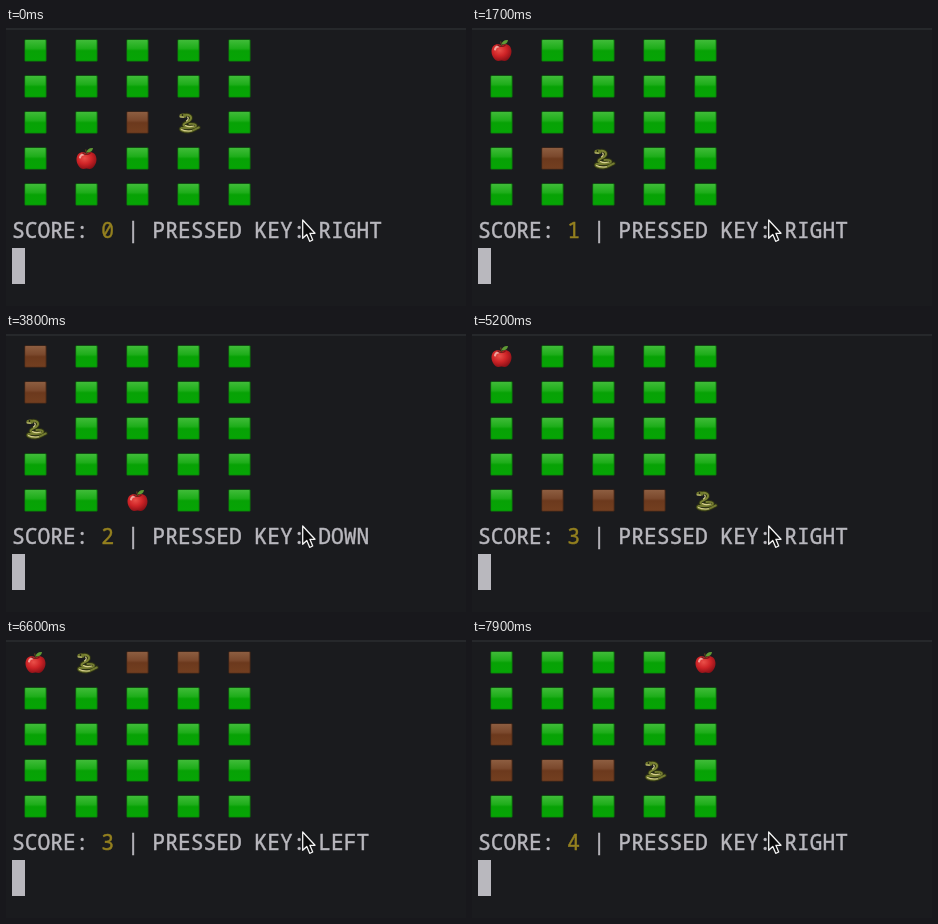
An HTML page for the animation above (8 s loop, 460 by 278 pixels).

```html
<!DOCTYPE html>
<html lang="en">
<head>
<meta charset="utf-8">
<title>Snake in a terminal</title>
<style>
  html, body { margin: 0; width: 100%; height: 100%; overflow: hidden; background: #1a1b1e; }
  svg { display: block; width: 100vw; height: 100vh; }
  text {
    font: 21.28px "Noto Sans Mono", "DejaVu Sans Mono", monospace;
    fill: #b9b8be; stroke: #b9b8be; stroke-width: .45; white-space: pre;
  }
  #score { fill: #94801f; stroke: #94801f; }
</style>
</head>
<body>
<svg viewBox="0 0 460 278">
  <defs>
    <linearGradient id="leafy" x2="0" y2="1">
      <stop offset="0" stop-color="#3fbb38"/>
      <stop offset=".4" stop-color="#1fae1b"/>
      <stop offset=".52" stop-color="#07a205"/>
      <stop offset="1" stop-color="#06a505"/>
    </linearGradient>
    <linearGradient id="earth" x2="0" y2="1">
      <stop offset="0" stop-color="#8d5d40"/>
      <stop offset=".4" stop-color="#7b492d"/>
      <stop offset=".52" stop-color="#6c391d"/>
      <stop offset="1" stop-color="#733f20"/>
    </linearGradient>
    <radialGradient id="skin" cx=".4" cy=".35" r=".7">
      <stop offset="0" stop-color="#ea5049"/>
      <stop offset=".5" stop-color="#cf2427"/>
      <stop offset="1" stop-color="#860f16"/>
    </radialGradient>
    <g id="grass">
      <rect x="-11" y="-11" width="22" height="22" rx="1" fill="#0a7d09"/>
      <rect x="-10.300" y="-10.400" width="20.400" height="20.600" rx=".6" fill="url(#leafy)"/>
    </g>
    <g id="body">
      <rect x="-11" y="-11" width="22" height="22" rx="1" fill="#4d2a17"/>
      <rect x="-10.300" y="-10.400" width="20.400" height="20.600" rx=".6" fill="url(#earth)"/>
    </g>
    <g id="apple">
      <path d="M0-5C4-8 10-6 10 1C10 6 6 11 3 10.500Q0 9.500-3 10.500C-6 11-10 6-10 1C-10-6-4-8 0-5Z" fill="url(#skin)"/>
      <path d="M-6.500-1Q-6-4-3-4" fill="none" stroke="#f0a39c" stroke-width="2" stroke-linecap="round"/>
      <path d="M-4-5.300Q0-3 4-5.300" fill="none" stroke="#7d1417" stroke-width="1.200"/>
      <path d="M0-4Q0-7-1-9" fill="none" stroke="#5a3a20" stroke-width="1.400"/>
      <path d="M0-6Q1-11 6.500-10.500Q6-6 0-6Z" fill="#5f9a35"/>
    </g>
    <path id="coil" d="M1 1.500C7 1 9 3 6 4.500C1 6.500-5 5-7 5.500C-10 7-5 9.300 0 9C5 8.800 7 6 10.300 5"/>
    <path id="neck" d="M-5-7.300C0-9 4-6 2-3C0 0-5 0-5 2.500C-5 4 0 4.500 3 4"/>
    <g id="head" fill="none" stroke-linecap="round" stroke-linejoin="round">
      <g stroke="#2f3414" stroke-width="3.800">
        <use href="#coil"/>
        <use href="#neck"/>
      </g>
      <use href="#coil" stroke="#747c31" stroke-width="1.900"/>
      <use href="#neck" stroke="#7c8434" stroke-width="2"/>
      <path d="M-1-5.500Q1-4-2-1.500M-7 7Q-3 9.200 3 8.300M-3 3Q0 5 5 3.500" stroke="#d6cf8e" stroke-width="1.100"/>
      <ellipse cx="-5.500" cy="-6.800" rx="3.600" ry="2.200" fill="#717a2d"/>
      <path d="M-8.500-5.600L-5-5.300" stroke="#d6cf8e" stroke-width=".9"/>
      <circle cx="-6" cy="-7.400" r=".8" fill="#14150a"/>
    </g>
  </defs>
  <rect width="460" height="278" fill="#1a1b1e"/>
  <rect width="460" height="2" fill="#26282b"/>
  <g id="field"></g>
  <text x="6" y="209.500" xml:space="preserve">SCORE: <tspan id="score">0</tspan> | PRESSED KEY: <tspan id="key">RIGHT</tspan></text>
  <rect x="6" y="220" width="13" height="36" fill="#b9b8be"/>
  <path d="M296.700 192V210.300L300.800 206.500L303.700 213.300L306.700 212L303.900 205.300H309Z" fill="#0b0b0c" stroke="#f4f4f4" stroke-width="1.300" stroke-linejoin="round"/>
</svg>
<script>
const LOOP = 8000, FRAME = 100, SIZE = 5;
const KEYS = { R: ["RIGHT", 1, 0], L: ["LEFT", -1, 0], U: ["UP", 0, -1], D: ["DOWN", 0, 1] };
const MOVES = "RRLLLLDRRRRUULLLULDDDDRRRRUUUULLLLDDDRRR";
const APPLES = [[1, 3], [0, 0], [2, 4], [0, 0], [4, 0]];

// Play the game once and keep the state after each move.
function play() {
  const states = [], trail = [[2, 2]];
  let score = 0;
  for (const move of MOVES) {
    const [key, dx, dy] = KEYS[move];
    const [x, y] = trail[0];
    const head = [x + dx, y + dy];
    trail.unshift(head);
    if (String(head) === String(APPLES[score])) score++;
    const length = states.length ? score : 1;
    states.push({ key, score, head, body: trail.slice(1, 1 + length) });
  }
  return states;
}

const states = play();
const field = document.getElementById("field");
const scoreText = document.getElementById("score");
const keyText = document.getElementById("key");

const cells = Array.from({ length: SIZE * SIZE }, (_, i) => {
  const cell = document.createElementNS("http://www.w3.org/2000/svg", "use");
  const x = 29.5 + 51 * (i % SIZE), y = 22.5 + 36 * Math.floor(i / SIZE);
  cell.setAttribute("transform", `translate(${x} ${y})`);
  return field.appendChild(cell);
});

// The game ticks a little faster near the end.
const moveTime = n => -63 + 203 * n - 12 * Math.max(0, n - 33);

function draw(time) {
  const now = Math.floor((time % LOOP) / FRAME) * FRAME;
  let n = 0;
  while (n + 1 < states.length && moveTime(n + 1) <= now) n++;
  const { key, score, head, body } = states[n];
  const kinds = Array(SIZE * SIZE).fill("grass");
  const put = ([x, y], kind) => { kinds[y * SIZE + x] = kind; };
  put(APPLES[score], "apple");
  body.forEach(part => put(part, "body"));
  put(head, "head");
  cells.forEach((cell, i) => cell.setAttribute("href", "#" + kinds[i]));
  scoreText.textContent = score;
  keyText.textContent = key;
}

const start = performance.now();
function tick() {
  draw(performance.now() - start);
  requestAnimationFrame(tick);
}
draw(0);
requestAnimationFrame(tick);
</script>
</body>
</html>
```
